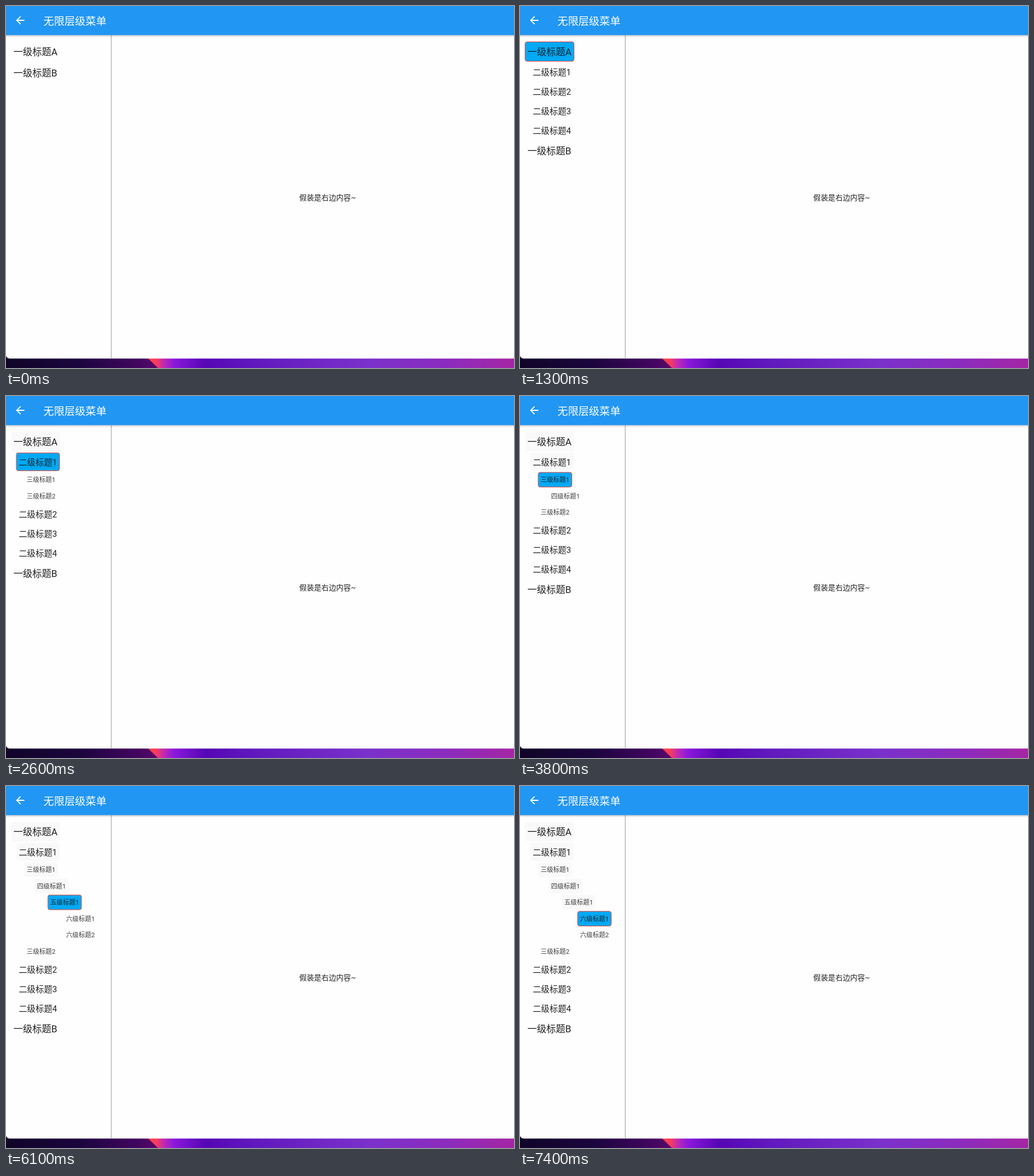
Recreate the animation shown at these times as an HTML page. Size 886x632 px, loop 8 s.

```html
<!DOCTYPE html>
<html lang="zh-CN">
<head>
<meta charset="utf-8">
<title>无限层级菜单</title>
<style>
  html, body { margin: 0; width: 100%; height: 100%; overflow: hidden; background: #fefefe; }
  svg { display: block; width: 886px; height: 632px; font-family: Roboto, "Noto Sans CJK SC", "Noto Sans CJK", sans-serif; }
  .row text { fill: #202020; }
  .row.small text { fill: #3c3c3c; }
  .row rect { fill: none; }
  .row.opened rect { fill: #f9f9f9; }
  .row.active rect { fill: #03a9f4; stroke: #f44336; }
  .row.active text { fill: #10222c; }
</style>
</head>
<body>
<svg viewBox="0 0 886 632">
  <defs>
    <linearGradient id="dark">
      <stop offset="0" stop-color="#100528"/>
      <stop offset=".45" stop-color="#1c053e"/>
      <stop offset=".8" stop-color="#430660"/>
      <stop offset="1" stop-color="#6a0a72"/>
    </linearGradient>
    <linearGradient id="bright" gradientUnits="userSpaceOnUse" x1="252" y1="616" x2="886" y2="616">
      <stop offset="0" stop-color="#ff4048"/>
      <stop offset=".018" stop-color="#f53a62"/>
      <stop offset=".035" stop-color="#c22bb0"/>
      <stop offset=".065" stop-color="#8a18dc"/>
      <stop offset=".15" stop-color="#5606b4"/>
      <stop offset=".28" stop-color="#5f18bd"/>
      <stop offset=".6" stop-color="#7b31cb"/>
      <stop offset=".82" stop-color="#8c2bbd"/>
      <stop offset="1" stop-color="#a526a4"/>
    </linearGradient>
    <linearGradient id="shade" x2="0" y2="1">
      <stop offset="0" stop-color="#000" stop-opacity=".28"/>
      <stop offset=".4" stop-color="#000" stop-opacity=".1"/>
      <stop offset="1" stop-color="#000" stop-opacity="0"/>
    </linearGradient>
  </defs>
  <rect y="600" width="290" height="32" fill="url(#dark)"/>
  <path d="M232 600H886V632H265Z" fill="url(#bright)"/>
  <path d="M0 0H886V615.5H7Q2 615.5 0 611Z" fill="#fefefe"/>
  <rect x="183" y="51" width="1" height="564.5" fill="#9c9c9c"/>
  <rect y="50.5" width="886" height="5" fill="url(#shade)"/>
  <rect width="886" height="50.8" fill="#2196f3"/>
  <path transform="translate(13.8 14) scale(.9167)" fill="#fff"
    d="M20 11H7.83l5.59-5.59L12 4l-8 8 8 8 1.41-1.41L7.83 13H20v-2z"/>
  <text x="65.3" y="32.7" font-size="18.33" fill="#fff">无限层级菜单</text>
  <text x="511.6" y="339.2" font-size="12.83" fill="#202020">假装是右边内容~</text>
  <g id="menu"></g>
</svg>
<script>
const LOOP = 8000;
const UNIT = 0.9167;
const TOP = 61.2;
const NUMERALS = '一二三四五六';
const STARTS = [0, 1300, 2600, 3800, 5000, 6100, 7400];
// Labels at each depth; the first one is the branch that opens.
const LEVELS = ['AB', '1234', '12', '1', '1', '12'];
const INDENT = [0, 10, 25, 45, 70, 100];
// Per depth: font size, row height and box width.
const STYLES = [[16.5, 36.67, 86.3], [14.67, 34, 76.3], [11, 28.5, 59.6]];

const menu = document.getElementById('menu');

function make(tag, attrs, parent) {
  const el = document.createElementNS('http://www.w3.org/2000/svg', tag);
  for (const key in attrs) el.setAttribute(key, attrs[key]);
  return parent.appendChild(el);
}

function makeRow(depth, label) {
  const [size, height, width] = STYLES[Math.min(depth, 2)];
  const x = 8.4 + INDENT[depth] * UNIT;
  const g = make('g', {}, menu);
  make('rect', { x: x + .5, y: 1.4, width: width - 1, height: height - 2.8, rx: 3.5 }, g);
  make('text', { x: x + 4.6, y: height / 2 + size * .39, 'font-size': size }, g)
    .textContent = NUMERALS[depth] + '级标题' + label;
  return { g, depth, height, first: label === LEVELS[depth][0] };
}

// Depth-first order: children follow their open parent.
function buildRows(depth = 0) {
  if (depth === LEVELS.length) return [];
  const [head, ...rest] = LEVELS[depth];
  return [
    makeRow(depth, head),
    ...buildRows(depth + 1),
    ...rest.map(label => makeRow(depth, label))
  ];
}

const rows = buildRows();

function show(step) {
  let y = TOP;
  for (const { g, depth, height, first } of rows) {
    const visible = depth <= step;
    g.style.display = visible ? '' : 'none';
    if (!visible) continue;
    let state = '';
    if (first && depth === step - 1) state = ' active';
    else if (first && depth < step - 1) state = ' opened';
    g.setAttribute('class', 'row' + (depth > 1 ? ' small' : '') + state);
    g.setAttribute('transform', `translate(0 ${y.toFixed(2)})`);
    y += height;
  }
}

let current = -1;
function tick() {
  const time = performance.now() % LOOP;
  const step = STARTS.filter(start => start <= time).length - 1;
  if (step !== current) show(current = step);
  requestAnimationFrame(tick);
}
tick();
</script>
</body>
</html>
```
